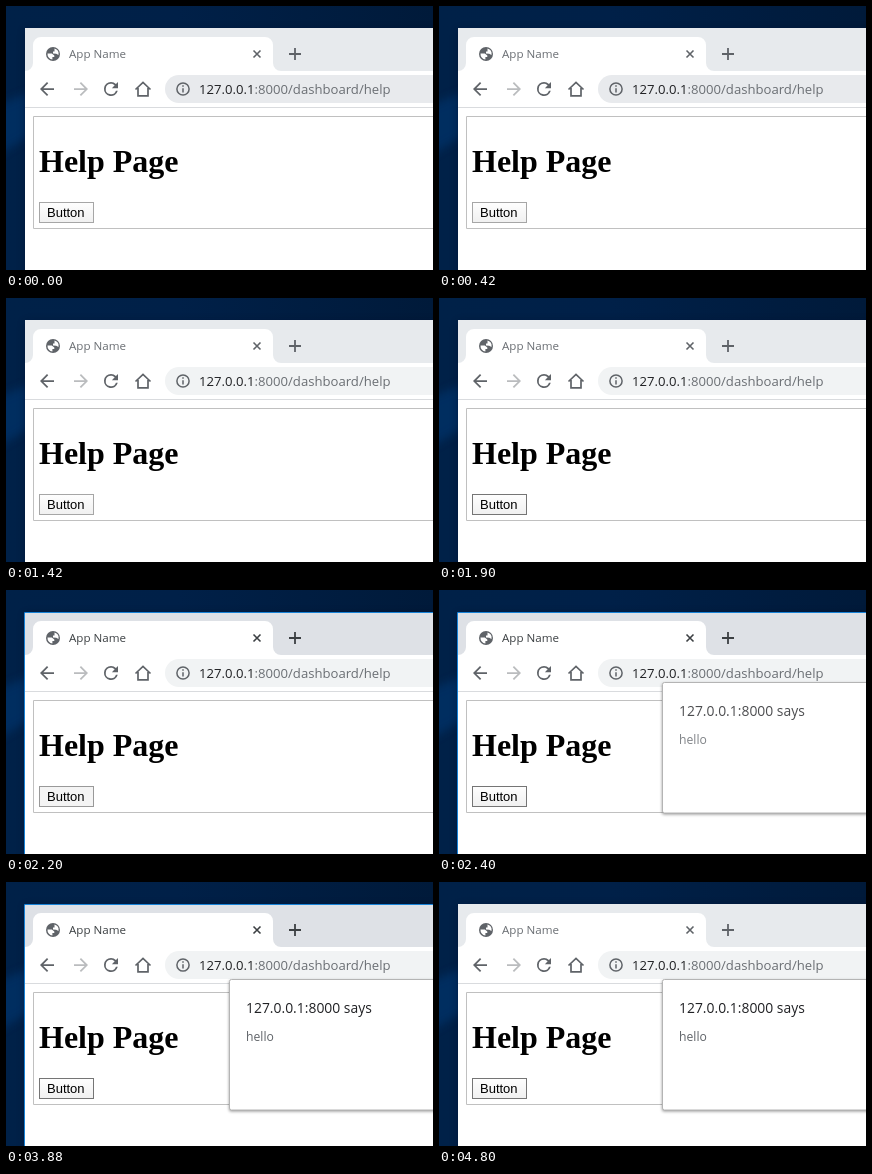
An HTML page for the animation above (4.9 s loop, 427 px wide and 264 px high).

```html
<!DOCTYPE html>
<html lang="en">
<head>
<meta charset="utf-8">
<title>Help page dialog</title>
<style>
  html, body { margin: 0; width: 100%; height: 100%; overflow: hidden; background: #00234a; }
  svg { display: block; width: 100vw; height: 100vh; }
  .ui { font-family: "Open Sans", "Noto Sans", sans-serif; }
  .icon { fill: #5f6368; }
</style>
</head>
<body>
<svg viewBox="0 0 427 264" preserveAspectRatio="none">
  <defs>
    <linearGradient id="desk" x2="1" y2="0">
      <stop offset="0" stop-color="#002148"/>
      <stop offset="0.4" stop-color="#002048"/>
      <stop offset="1" stop-color="#001a3a"/>
    </linearGradient>
    <linearGradient id="face" x2="0" y2="1">
      <stop offset="0" stop-color="#fefefe"/>
      <stop offset="1" stop-color="#f0f0f0"/>
    </linearGradient>
    <filter id="soft" x="-20%" y="-20%" width="140%" height="140%">
      <feGaussianBlur stdDeviation="1.6"/>
    </filter>
    <filter id="wide" x="-20%" y="-20%" width="140%" height="140%">
      <feGaussianBlur stdDeviation="4"/>
    </filter>
    <path id="arrow" d="M20 11H7.83l5.59-5.59L12 4l-8 8 8 8 1.41-1.41L7.83 13H20z"/>
  </defs>

  <rect width="427" height="264" fill="url(#desk)"/>
  <path d="M-10 100L24 86v44L-10 150Z" fill="#003a78" opacity=".5" filter="url(#wide)"/>
  <rect x="19" y="24" width="460" height="300" fill="#000b1e" opacity=".3" filter="url(#wide)"/>

  <rect id="strip" x="19" y="22" width="408" height="43"/>
  <path d="M19 65a8 8 0 0 0 8-8V39a8 8 0 0 1 8-8H259a8 8 0 0 1 8 8v18a8 8 0 0 0 8 8Z" fill="#fff"/>
  <rect x="19" y="65" width="408" height="199" fill="#fff"/>
  <path id="edge" d="M18.500 264V22.500H427" fill="none" stroke="#1883d7"/>
  <path d="M19 101.500H427" stroke="#d9dbde"/>

  <circle class="icon" cx="47" cy="48" r="7"/>
  <path fill="#fff" d="M41.500 47.500h4.300l2.500 2v1.600h-1.900v2.500a5.700 5.700 0 0 1-4.900-6.100zM48.500 42.600a5.600 5.600 0 0 1 4 6.300l-2.300-1.200-3.200-.2v-1.900h1.500z"/>
  <text id="tabTitle" class="ui" x="63" y="52" font-size="11.6">App Name</text>
  <g id="tabIcons" fill="none">
    <path d="M247.500 44.500l7 7m0-7l-7 7" stroke-width="1.6"/>
    <path d="M283 48h12m-6-6v12" stroke-width="1.8"/>
  </g>

  <use href="#arrow" class="icon" transform="translate(30.500 72.500) scale(.875)"/>
  <use href="#arrow" fill="#babcbe" transform="translate(85.500 72.500) scale(-.875 .875)"/>
  <path class="icon" transform="translate(94.500 72.500) scale(.875)" d="M17.650 6.350A7.960 7.960 0 0 0 12 4a8 8 0 1 0 7.730 10h-2.080A6 6 0 1 1 12 6c1.660 0 3.140.690 4.220 1.780L13 11h7V4z"/>
  <path d="M129.500 83.500l7.500-7 7.500 7M132 82v7.800h10V82" fill="none" stroke="#5f6368" stroke-width="1.7"/>

  <rect id="address" x="159" y="69" width="300" height="28" rx="14"/>
  <circle cx="177" cy="83" r="6.1" fill="none" stroke="#5f6368" stroke-width="1.5"/>
  <path d="M177 79.300v1.500m0 1.500v4.300" stroke="#5f6368" stroke-width="1.5"/>
  <text class="ui" x="193" y="88" font-size="13.13" fill="#6b6f74"><tspan fill="#202124">127.0.0.1</tspan>:8000/dashboard/help</text>

  <path d="M430 110.500H27.500v112H430" fill="none" stroke="#c0c0c0"/>
  <text x="33" y="166" font-size="32" font-weight="700" font-family="'Liberation Serif', 'Times New Roman', serif">Help Page</text>
  <rect id="button" x="33.500" y="196.500" width="54" height="20"/>
  <text x="41" y="211" font-size="13" font-family="'Liberation Sans', Arial, sans-serif">Button</text>

  <g id="dialog">
    <rect x="223" y="98.500" width="240" height="131" rx="2" fill="#000" opacity=".4" filter="url(#soft)"/>
    <rect x="223.500" y="97.500" width="240" height="130.500" rx="2" fill="#fff" stroke="#b4b4b4"/>
    <g id="message" class="ui">
      <text x="240" y="131" font-size="13.9" fill="#202124">127.0.0.1:8000 says</text>
      <text x="240" y="158.500" font-size="12.2" fill="#5f6368">hello</text>
    </g>
  </g>
</svg>
<script>
  const LOOP = 4900;
  const el = id => document.getElementById(id);
  const set = (id, attrs) => {
    for (const name in attrs) el(id).setAttribute(name, attrs[name]);
  };
  const within = (t, from, to) => t >= from && t < to;
  const shown = on => on ? 'visible' : 'hidden';

  function draw(t) {
    const active = within(t, 2200, 4800);
    const over = t >= 1900;
    const pressed = within(t, 2200, 2400);
    const entering = within(t, 2400, 2500);

    set('edge', { visibility: shown(active) });
    set('strip', { fill: active ? '#dee1e6' : '#e7eaed' });
    set('tabTitle', { fill: active ? '#3c4043' : '#6a6e73' });
    set('tabIcons', { stroke: active ? '#3c4043' : '#5f6368' });
    set('address', { fill: t < 700 ? '#e8eaed' : '#f1f3f4' });
    set('button', {
      fill: pressed ? '#f4f4f4' : 'url(#face)',
      stroke: pressed ? '#999' : over ? '#757575' : '#a6a6a6'
    });
    set('dialog', {
      visibility: shown(t >= 2400),
      transform: `translate(0 ${entering ? -5 : 0})`
    });
    set('message', { opacity: entering ? 0.8 : 1 });
  }

  const start = performance.now();
  function tick() {
    draw((performance.now() - start) % LOOP);
    requestAnimationFrame(tick);
  }
  draw(0);
  requestAnimationFrame(tick);
</script>
</body>
</html>
```
